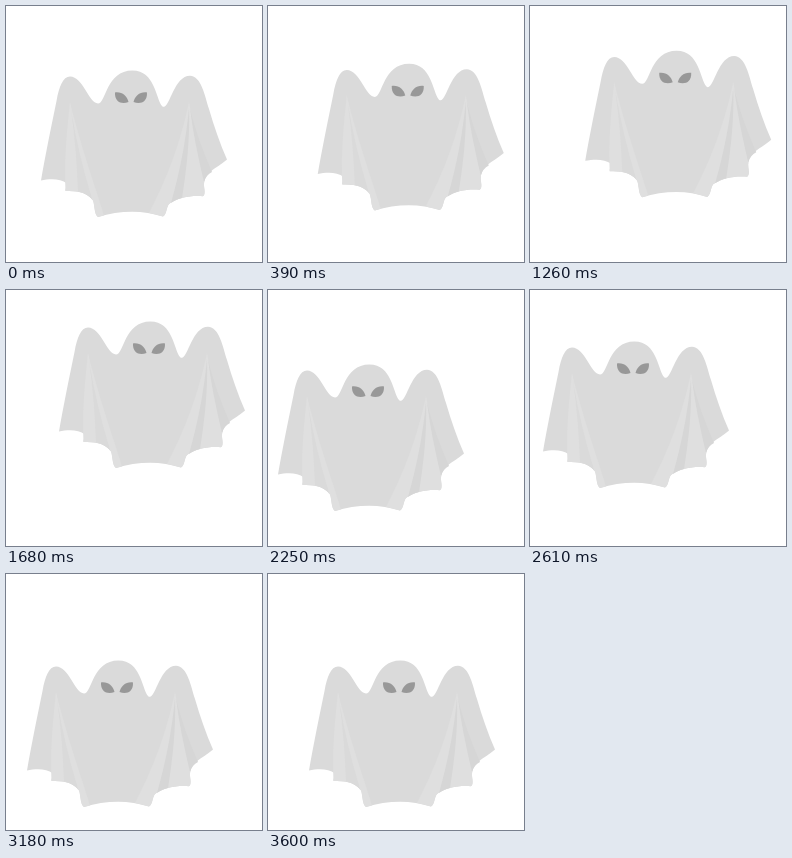
Write an HTML page that moves like this. It is 256 px wide and 256 px high and loops after 4.08 s.

```html
<!DOCTYPE html>
<html lang="en">
<head>
<meta charset="utf-8">
<title>Ghost</title>
<style>
  html, body { margin: 0; width: 100%; height: 100%; overflow: hidden; background: #fff; }
  svg { display: block; width: 100%; height: 100%; }
  .body { fill: #dadada; }
  .light { fill: #dfdfdf; }
  .dark { fill: #d6d6d6; }
  .eyes { fill: #989898; }
</style>
</head>
<body>
<svg viewBox="0 0 256 256">
  <g id="ghost">
    <path class="body" d="M35 174.500C39 151 45 122 50.500 95C53 81 57 70.600 64 70.600C77 70.600 83 97.500 92 97.500C100 97.500 100 64.400 126.500 64.400C149 64.400 150 93 156 100C163 107 167 69.700 184 69.700C195 69.700 199 90 203 103C208 120 214 138 221 153.500C214 160 203 164 199 173C196 180 201 187 197 190.300C185 189.500 173 191 163 198C160 202 161 208 157 210.600C136 203.600 113 204.600 92 211C88 208 89 200 87 194.500C80 185 69 185 59.500 185C59 181.500 62 180 61 177.500C54 172 43 173 35 174.500Z"/>
    <path class="light" d="M64 96C61 124 58 154 59.500 185C69 185 80 185 87 194.500C89 200 88 208 92 211L98 209.400C86 171 73 134 64 96Z"/>
    <path class="body" d="M65 104C69 132 71 159 72 185.500Q80 187 86 193C77 163 70 134 65 104Z"/>
    <path class="light" d="M183 96C175 135 161 173 143 207L157 210.600C161 208 160 202 163 198C173 191 185 189.500 197 190.300C201 187 196 180 199 173C193 149 188 122 183 96Z"/>
    <path class="dark" d="M183 102C180 134 174 165 165 197Q170 193 176 192C181 161 184 131 183 102Z"/>
    <path class="dark" d="M184 102C187 127 192 150 198 176Q200 169 206 166C197 145 189 124 184 102Z"/>
    <g class="eyes">
      <path id="eye" d="M109 86.500C116 85.500 121 90 122.500 96C116 98.500 108.500 96.500 109 86.500Z"/>
      <use href="#eye" transform="matrix(-1 0 0 1 250 0)"/>
    </g>
  </g>
</svg>
<script>
const LOOP = 4080;
const STEPS = 58;
const SWING = 420;

// Turning points of the flight: time, x, y
const stops = [
  [0, 0, 0], [750, 29, -13], [1680, 18, -33], [2250, -25, 10],
  [2610, -22, -13], [3180, -14, 22], [3600, 6, 22]
];

// About sixteen steps a second on a 30 ms grid
const stepTime = k => k && 30 * (2 * k + 1 + Math.floor(k / 14.6));
const mix = (a, b, u) => a + (b - a) * u;

function heldTime(t) {
  let k = 0;
  while (k < STEPS && stepTime(k + 1) <= t) k++;
  return stepTime(k);
}

// Glide between stops while swinging through the centre
function position(t) {
  const next = stops.findIndex(s => s[0] >= t) || 1;
  const [t0, x0, y0] = stops[next - 1];
  const [t1, x1, y1] = stops[next];
  const u = (t - t0) / (t1 - t0);
  const swing = Math.cos(2 * Math.PI * Math.round((t1 - t0) / SWING) * u);
  return [mix(x0, x1, u) * (1 + 2 * swing) / 3, mix(y0, y1, u) * swing];
}

const ghost = document.getElementById('ghost');
const start = performance.now();

function draw(now) {
  const t = Math.max(0, now - start) % LOOP;
  ghost.setAttribute('transform', `translate(${position(heldTime(t))})`);
  requestAnimationFrame(draw);
}
draw(start);
</script>
</body>
</html>
```
